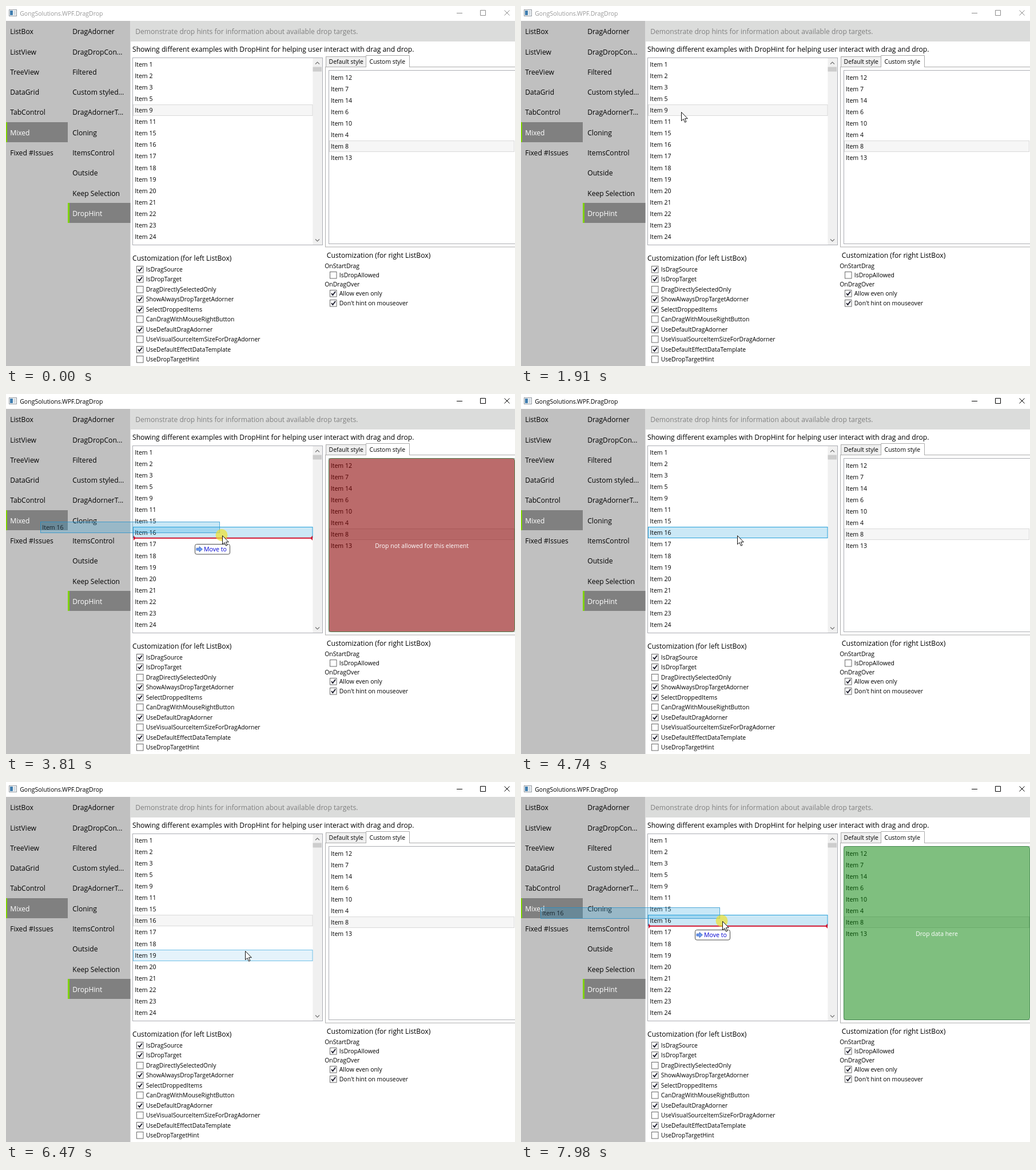
These frames come from a looping animation (890 by 629 pixels, 8 s). An HTML page:

```html
<!DOCTYPE html>
<html lang="en">
<head>
<meta charset="utf-8">
<title>Drop hints</title>
<style>
  html, body { margin: 0; width: 100%; height: 100%; overflow: hidden; background: #fff; }
  svg { display: block; font-family: "Open Sans", "Noto Sans", sans-serif; }
  text { white-space: pre; }
</style>
</head>
<body>
<svg id="stage" width="890" height="629" viewBox="0 0 890 629"></svg>
<script>
const LOOP = 8000, BIG = 12.14, SMALL = 10.45, LABEL = 10.38, ITEM = 10.6;
const stage = document.getElementById('stage');

function add(tag, attrs, parent = stage) {
  const el = document.createElementNS('http://www.w3.org/2000/svg', tag);
  for (const k in attrs) el.setAttribute(k, attrs[k]);
  return parent.appendChild(el);
}
const group = () => add('g', {});
const box = (x, y, width, height, fill, stroke = 'none', parent, rx = 0) =>
  add('rect', { x, y, width, height, fill, stroke, rx }, parent);
const line = (d, stroke, width = 1, parent) =>
  add('path', { d, stroke, 'stroke-width': width, fill: 'none' }, parent);
function text(str, x, y, size, fill = '#000', parent) {
  const el = add('text', { x, y, 'font-size': size, fill }, parent);
  el.textContent = str;
  return el;
}
const show = (el, on) => el.setAttribute('visibility', on ? 'visible' : 'hidden');
const place = (el, x, y) => el.setAttribute('transform', `translate(${x} ${y})`);

// Title bar
box(5.5, 6.5, 13, 11, '#fff', '#8d949c');
box(7, 8, 5, 8, '#3f7cae');
box(13, 8, 4, 8, '#d5dde3');
const title = text('GongSolutions.WPF.DragDrop', 24.2, 16.6, 10.52);
const buttons = line('M788 12.5H798M829.5 7.5H838.5V16.5H829.5ZM871.5 7.5L880.5 16.5M880.5 7.5L871.5 16.5', '#000');

// Side menus
box(0, 26, 217.5, 603, '#c0c0c0');
function menu(x, width, names, current) {
  names.forEach((name, i) => {
    const y = 45 + 35.28 * i;
    if (i === current) {
      const top = Math.floor(y - 18);
      box(x, top, width, 35, '#808080');
      box(x, top, 3, 35, '#7fd200');
    }
    text(name, x + 8.2, y + 4.3, BIG, i === current ? '#fff' : '#000');
  });
}
menu(-1, 109, ['ListBox', 'ListView', 'TreeView', 'DataGrid', 'TabControl', 'Mixed', 'Fixed #Issues'], 5);
menu(108, 109.5, ['DragAdorner', 'DragDropCon...', 'Filtered', 'Custom styled...', 'DragAdornerT...',
  'Cloning', 'ItemsControl', 'Outside', 'Keep Selection', 'DropHint'], 9);

// Headings
box(217.5, 26, 672.5, 36, '#dbdcdb');
text('Demonstrate drop hints for information about available drop targets.', 226.2, 49.2, 12.1, '#808080');
text('Showing different examples with DropHint for helping user interact with drag and drop.', 221, 79.6, BIG);

// Left list
const rowTop = i => Math.round(91.9 + 20.07 * i) + 0.5;
box(221.5, 90.5, 332, 327, '#fff', '#abadb3');
box(536.5, 91, 16.5, 326, '#f0f0f0');
box(536.5, 106.5, 15.5, 8, '#cdcdcd');
line('M541 101.5L544.5 98L548 101.5M541 407.5L544.5 411L548 407.5', '#707070', 1.1);
const selected = box(222.5, 0, 313.5, 19, '#f6f6f6');
const hover = box(222.5, 0, 313.5, 19, '#e5f3fb', '#70c0e7');
[1, 2, 3, 5, 9, 11, 15, 16, 17, 18, 19, 20, 21, 22, 23, 24].forEach((n, i) =>
  text('Item ' + n, 225.2, 105.9 + 20.07 * i, ITEM));

// Right tabs and list
box(558.5, 106.5, 340, 314.5, '#fff', '#acacac');
box(559.5, 88.5, 70, 18, '#f0f0f0', '#acacac');
line('M629.5 107V86.5H705.5V107', '#acacac');
box(630, 87, 75, 21, '#fff');
text('Default style', 564.6, 101, LABEL);
text('Custom style', 635.6, 101, LABEL);
box(564.5, 112.5, 340, 303, '#fff', '#abadb3');
box(565.5, 235.5, 323, 19, '#f6f6f6', '#dadada');
[12, 7, 14, 6, 10, 4, 8, 13].forEach((n, i) =>
  text('Item ' + n, 567.7, 128.9 + 20.07 * i, ITEM));

// Options
function check(label, x, y, on) {
  box(x + 0.5, y - 5.5, 11.5, 11.5, '#fff', '#6a6a6a');
  const tick = line(`M${x + 3} ${y + 0.2}L${x + 5.4} ${y + 3}L${x + 10} ${y - 3.2}`, '#1a1a2a', 1.9);
  show(tick, on);
  text(label, x + 16.8, y + 4, LABEL);
  return tick;
}
text('Customization (for left ListBox)', 221, 444.6, BIG);
['IsDragSource', 'IsDropTarget', 'DragDirectlySelectedOnly', 'ShowAlwaysDropTargetAdorner',
  'SelectDroppedItems', 'CanDragWithMouseRightButton', 'UseDefaultDragAdorner',
  'UseVisualSourceItemSizeForDragAdorner', 'UseDefaultEffectDataTemplate', 'UseDropTargetHint']
  .forEach((label, i) => check(label, 228, Math.round(460 + 17.44 * i), [0, 1, 3, 4, 6, 8].includes(i)));
text('Customization (for right ListBox)', 560.8, 440.2, BIG);
text('OnStartDrag', 557.2, 458.2, SMALL);
const allowTick = check('IsDropAllowed', 566, 470, false);
text('OnDragOver', 557.2, 490.2, SMALL);
check('Allow even only', 566, 502, true);
check("Don't hint on mouseover", 566, 519, true);

// Drop hint over the right list
const hint = group();
const hintBox = box(564.5, 112.5, 325, 303, '#8b0000', '#2f7d3b', hint, 4);
hintBox.setAttribute('stroke-opacity', 0.75);
const hintText = text('', 727, 268.7, SMALL, '#fff', hint);
hintText.setAttribute('text-anchor', 'middle');

// Insertion line
const insertion = group();
line('M223 251.7H536', '#d0142f', 2, insertion);
add('path', { d: 'M223 247.5L227 251.7L223 256ZM536 247.5L532 251.7L536 256Z', fill: '#d0142f' }, insertion);

// Dragged row and effect label, relative to the pointer tip
const ghost = group();
const ghostRow = box(-317.5, -23.5, 313, 19, '#26a0da', '#1f8fcb', ghost);
ghostRow.setAttribute('fill-opacity', 0.25);
ghostRow.setAttribute('stroke-opacity', 0.75);
text('Item 16', -314.8, -9.8, ITEM, '#16222a', ghost);
box(-47.5, 15.5, 61, 17.5, '#fff', '#4a4a4a', ghost, 3);
add('path', { d: 'M-45 22.3H-40V19.6L-34.6 24.2L-40 28.8V26.1H-45Z', fill: '#6f9df0', stroke: '#2c56b8', 'stroke-width': 0.8 }, ghost);
text('Move to', -32, 28, ITEM, '#0000d0', ghost);

const press = add('circle', { r: 10.5, fill: '#f0e02a', 'fill-opacity': 0.68 });
const pointer = add('path', {
  d: 'M0 0V15.2L3.5 12L6 17.7L8.4 16.7L6 11.2H10.8Z',
  fill: '#fff', stroke: '#111', 'stroke-linejoin': 'round'
});

// Pointer moves: first step, last step, steps, x, y, ease-out power
const START = [820, 722];
const MOVES = [
  [330, 1030, 11, 273, 166, 2],
  [1160, 1360, 3, 277, 174, 1],
  [1760, 2510, 10, 291, 229, 1],
  [2580, 2650, 2, 293, 246, 1],
  [3240, 3810, 9, 378, 247, 3],
  [5080, 5850, 12, 590, 460, 3],
  [5920, 5920, 1, 597, 467, 1],
  [6190, 6470, 5, 418, 295, 1.5],
  [6540, 6680, 3, 362, 264, 1.3],
  [6750, 6960, 4, 322, 241, 1.5],
  [7360, 7980, 9, 352, 243, 2]
];
function pointerAt(t) {
  let [x, y] = START;
  for (const [from, to, steps, tx, ty, power] of MOVES) {
    if (t < from) break;
    const gap = (to - from) / (steps - 1) || 1;
    const step = Math.min(steps, Math.floor((t - from) / gap + 1e-6) + 1);
    const e = 1 - Math.pow(1 - step / steps, power);
    x += (tx - x) * e;
    y += (ty - y) * e;
  }
  return [x, y];
}

const within = (t, ...spans) => spans.some(([a, b]) => t >= a && t < b);

function draw(t) {
  const [x, y] = pointerAt(t);
  const focused = t >= 2980;
  const dragging = within(t, [3240, 4740], [7360, LOOP]);
  const pressed = within(t, [2980, 4740], [5920, 6120], [7290, LOOP]);
  const allowed = t >= 5990;

  title.setAttribute('fill', focused ? '#000' : '#999');
  buttons.setAttribute('stroke', focused ? '#000' : '#8c8c8c');

  const current = focused ? 7 : 4;
  const active = within(t, [2980, 5920], [7290, LOOP]);
  selected.setAttribute('y', rowTop(current));
  selected.setAttribute('fill', active ? '#cbe8f6' : '#f6f6f6');
  selected.setAttribute('stroke', active ? '#26a0da' : '#dadada');

  const row = Math.floor((y - 92) / 20.07);
  const over = t >= 330 && !pressed && x > 222 && x < 537 && row >= 0 && row < 16 && row !== current;
  show(hover, over);
  if (over) hover.setAttribute('y', rowTop(row));

  show(allowTick, allowed);
  show(hint, dragging);
  show(insertion, dragging);
  show(ghost, dragging);
  hintBox.setAttribute('fill', allowed ? '#008000' : '#8b0000');
  hintBox.setAttribute('fill-opacity', allowed ? 0.5 : 0.58);
  hintText.textContent = allowed ? 'Drop data here' : 'Drop not allowed for this element';

  show(press, pressed);
  show(pointer, t >= 330);
  place(ghost, Math.round(x), Math.round(y));
  place(press, x - 1, y - 0.5);
  place(pointer, Math.round(x) + 0.5, Math.round(y) + 0.5);
}

const began = performance.now();
function tick() {
  draw((performance.now() - began) % LOOP);
  requestAnimationFrame(tick);
}
draw(0);
requestAnimationFrame(tick);
</script>
</body>
</html>
```
